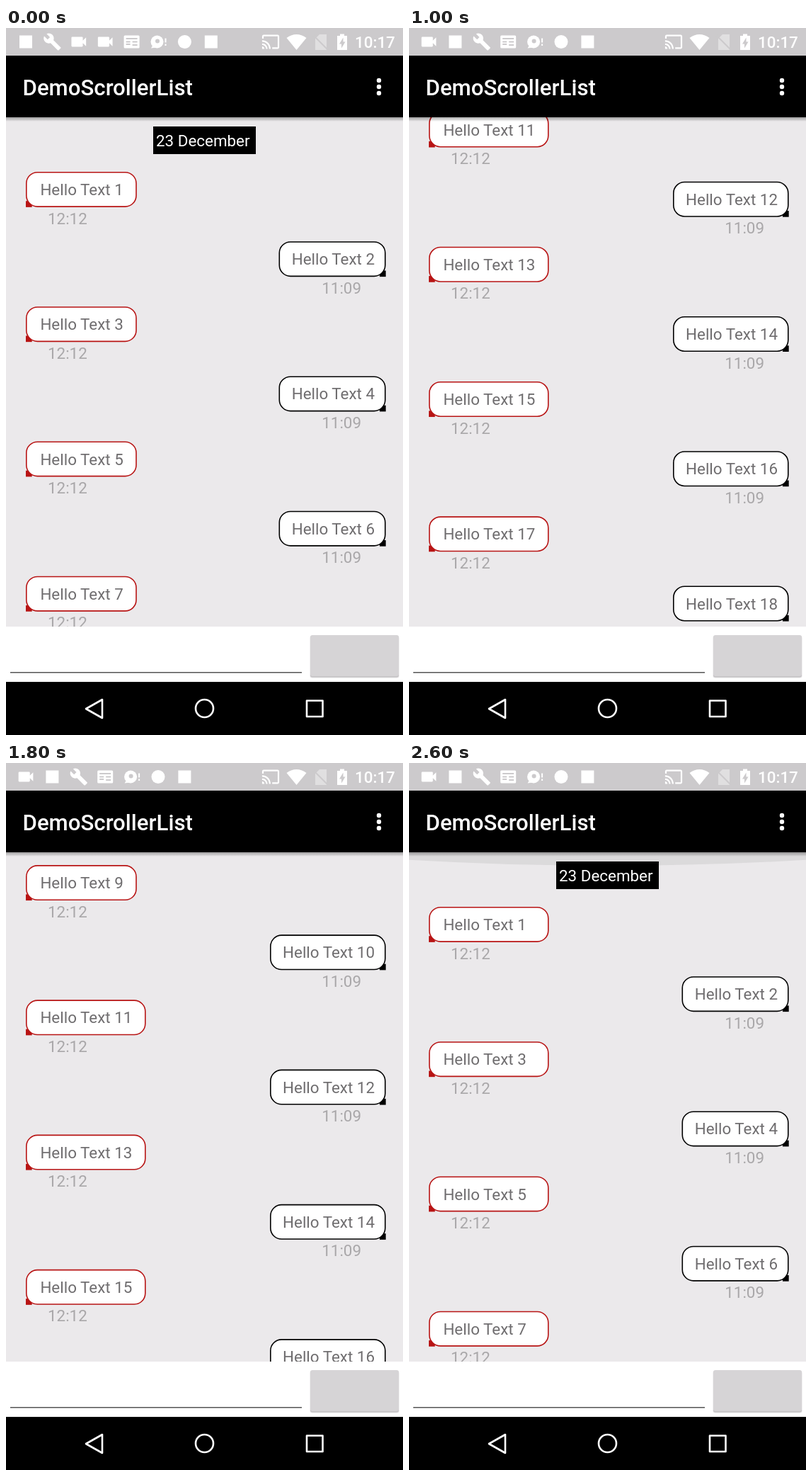
An HTML page for the animation above (5.1 s loop, 561 by 998 pixels).

```html
<!DOCTYPE html>
<html lang="en">
<head>
<meta charset="utf-8">
<title>Chat list</title>
<style>
  html, body { margin: 0; width: 100%; height: 100%; overflow: hidden; background: #ebe9eb; }
  svg { display: block; width: 561px; height: 998px; font: 22.4px Roboto, sans-serif; }
  .msg { fill: #6f6d6f; }
  .time { fill: #a9a7a9; }
  .end { text-anchor: end; }
  .glow { fill: #000; fill-opacity: .065; }
</style>
</head>
<body>
<svg viewBox="0 0 561 998">
  <defs>
    <linearGradient id="shade" x2="0" y2="1">
      <stop stop-color="#000" stop-opacity=".32"/>
      <stop offset="1" stop-color="#000" stop-opacity="0"/>
    </linearGradient>
    <path id="cam" transform="scale(1.15) translate(-12 -12)" d="M17 10.5V7q0-1-1-1H4q-1 0-1 1v10q0 1 1 1h12q1 0 1-1v-3.5l4 4v-11z"/>
    <path id="wrench" transform="scale(1.1) translate(-12 -12)" d="M22.7 19l-9.1-9.1c.9-2.3.4-5-1.5-6.9-2-2-5-2.4-7.4-1.3L9 6 6 9 1.6 4.7C.4 7.1.9 10.1 2.9 12.1c1.9 1.9 4.6 2.4 6.9 1.5l9.1 9.1c.4.4 1 .4 1.4 0l2.3-2.3c.5-.4.5-1.1.1-1.4z"/>
    <rect id="square" x="-9" y="-9" width="18" height="18"/>
    <circle id="dot" r="9.5"/>
    <g id="news">
      <rect x="-11" y="-9" width="22" height="18" rx="1.5"/>
      <path d="M-8-4.5H8M1 0H8M1 4.5H8M-8 0h6M-8 3.5h6" stroke="#cccacc" stroke-width="2"/>
    </g>
    <g id="disc">
      <circle cx="-1.5" r="9"/>
      <path d="M-10 9l3-5 4 4z"/>
      <circle cx="-1" cy="-1" r="3" fill="#cccacc"/>
      <path d="M10.5-5v6M10.5 3v2.5" stroke="#fff" stroke-width="2"/>
    </g>
  </defs>

  <rect width="561" height="998" fill="#ebe9eb"/>
  <g id="list">
    <rect x="208" y="139" width="145" height="39"/>
    <text x="212" y="167" fill="#fff">23 December</text>
  </g>
  <path id="topGlow" class="glow"/>
  <path id="endGlow" class="glow"/>
  <rect y="126" width="561" height="6" fill="url(#shade)"/>

  <rect width="561" height="39" fill="#cccacc"/>
  <g id="notes" fill="#fff"></g>
  <g fill="#fff">
    <path transform="translate(374 19.5) scale(1.1) translate(-12 -12)" d="M21 3H3c-1.1 0-2 .9-2 2v3h2V5h18v14h-7v2h7c1.1 0 2-.9 2-2V5c0-1.1-.9-2-2-2zM1 18v3h3c0-1.66-1.34-3-3-3zm0-4v2c2.76 0 5 2.24 5 5h2c0-3.87-3.13-7-7-7zm0-4v2c4.97 0 9 4.03 9 9h2c0-6.08-4.93-11-11-11z"/>
    <path d="M396.5 14Q410.500 4 424.500 14L410.500 31z"/>
    <path d="M443 9h10v22h-16V15z" opacity=".4"/>
    <path d="M434 10l20 20" stroke="#cccacc" stroke-width="2"/>
    <path d="M468 11h4V8.500h6V11h4v20h-14z"/>
    <path d="M476.500 13.500l-5.500 9h3v6l5.500-9h-3z" fill="#cccacc"/>
    <text x="493" y="27.500" font-weight="500">10:17</text>
  </g>

  <rect y="39" width="561" height="87"/>
  <text x="23.500" y="95" fill="#fff" font-size="31.2" font-weight="500">DemoScrollerList</text>
  <g fill="#fff">
    <circle cx="527" cy="74" r="3.200"/><circle cx="527" cy="83" r="3.200"/><circle cx="527" cy="92" r="3.200"/>
  </g>

  <rect y="845" width="561" height="78" fill="#fff"/>
  <path d="M6 909.700H418" stroke="#555" stroke-width="1.500"/>
  <rect x="429.500" y="858" width="126" height="59.500" rx="3" fill="#e4e2e4"/>
  <rect x="430" y="858" width="125" height="58.500" rx="3" fill="#c4c2c4"/>
  <rect x="430" y="857" width="125" height="58" rx="3" fill="#d6d4d6"/>

  <rect y="923" width="561" height="75"/>
  <g fill="none" stroke="#fff" stroke-width="2.600" stroke-linejoin="round">
    <path d="M136 948v26l-23-13z"/>
    <circle cx="280.500" cy="960.500" r="12.500"/>
    <rect x="425" y="949.500" width="22.500" height="22.500"/>
  </g>
</svg>
<script>
const LOOP = 5100, STEP = 100, ROW = 95.13, TOP = 126, BOTTOM = 845;
const $ = id => document.getElementById(id);

// Each key is [time, value, velocity per ms]
const scrollKeys = [[0, 0, 0], [600, 327.4, 1.4], [1000, 1035.7, .9], [1300, 1149.6, 0],
  [1500, 1149.6, 0], [2000, 418.5, -2], [2200, 47.8, -1.2], [2300, 0, 0]];
const topKeys = [[2200, 0, 0], [2400, 67, 0], [2600, 19, 0]];
const endKeys = [[1200, 0, 0], [1300, 20, 0], [1500, 2, 0], [1600, 0, 0]];

function sample(keys, t) {
  if (t <= keys[0][0]) return keys[0][1];
  const i = keys.findIndex(k => k[0] >= t);
  if (i < 0) return keys[keys.length - 1][1];
  const [t0, a, va] = keys[i - 1], [t1, b, vb] = keys[i];
  const h = t1 - t0, u = (t - t0) / h, w = 1 - u;
  return a * w * w * (1 + 2 * u) + b * u * u * (3 - 2 * u) + h * u * w * (va * w - vb * u);
}

function message(n) {
  const left = n % 2 === 1, color = left ? '#b81414' : '#000';
  const y = 203.7 + (n - 1) * ROW + (left ? 0 : 3.1);
  const width = n > 9 ? (left ? 168 : 162) : (left ? 155.2 : 149.5);
  const x = left ? 28.8 : 535.8 - width;
  const align = left ? '' : ' end';
  return `<rect x="${left ? 28 : 528}" y="${y + 40.5}" width="8.7" height="8.7" fill="${color}"/>
    <rect id="bubble${n}" x="${x}" y="${y}" width="${width}" height="48.4" rx="15.6" fill="#fff" stroke="${color}" stroke-width="1.6"/>
    <text class="msg${align}" x="${left ? 48.4 : 521}" y="${y + 32.3}">Hello Text ${n}</text>
    <text class="time${align}" x="${left ? 59 : 502}" y="${y + 72.8}">${left ? '12:12' : '11:09'}</text>`;
}

function glow(edge, depth) {
  const side = edge + depth * .57;
  return `M0 ${edge}V${side}Q280.5 ${edge + depth * 1.43} 561 ${side}V${edge}z`;
}

const icons = names => names.split(' ')
  .map((name, i) => `<use href="#${name}" x="${28 + i * 37.4}" y="19.5"/>`).join('');
const early = icons('square wrench cam cam news disc dot square');
const late = icons('cam square wrench news disc dot square');

for (let n = 1; n <= 19; n++) $('list').insertAdjacentHTML('beforeend', message(n));

let shown = -1;
function draw(now) {
  const t = Math.floor(now % LOOP / STEP) * STEP;
  if (t !== shown) {
    shown = t;
    $('list').setAttribute('transform', `translate(0 ${-sample(scrollKeys, t)})`);
    $('topGlow').setAttribute('d', glow(TOP, sample(topKeys, t)));
    $('endGlow').setAttribute('d', glow(BOTTOM, -sample(endKeys, t)));
    $('notes').innerHTML = t < 300 ? early : late;
    // Reused rows keep their wider bubble on the way back
    for (let n = 1; n < 9; n += 2) $('bubble' + n).setAttribute('width', t < 1500 ? 155.2 : 168);
  }
  requestAnimationFrame(frame);
}

let start;
function frame(now) {
  start ??= now;
  draw(now - start);
}
draw(0);
</script>
</body>
</html>
```
